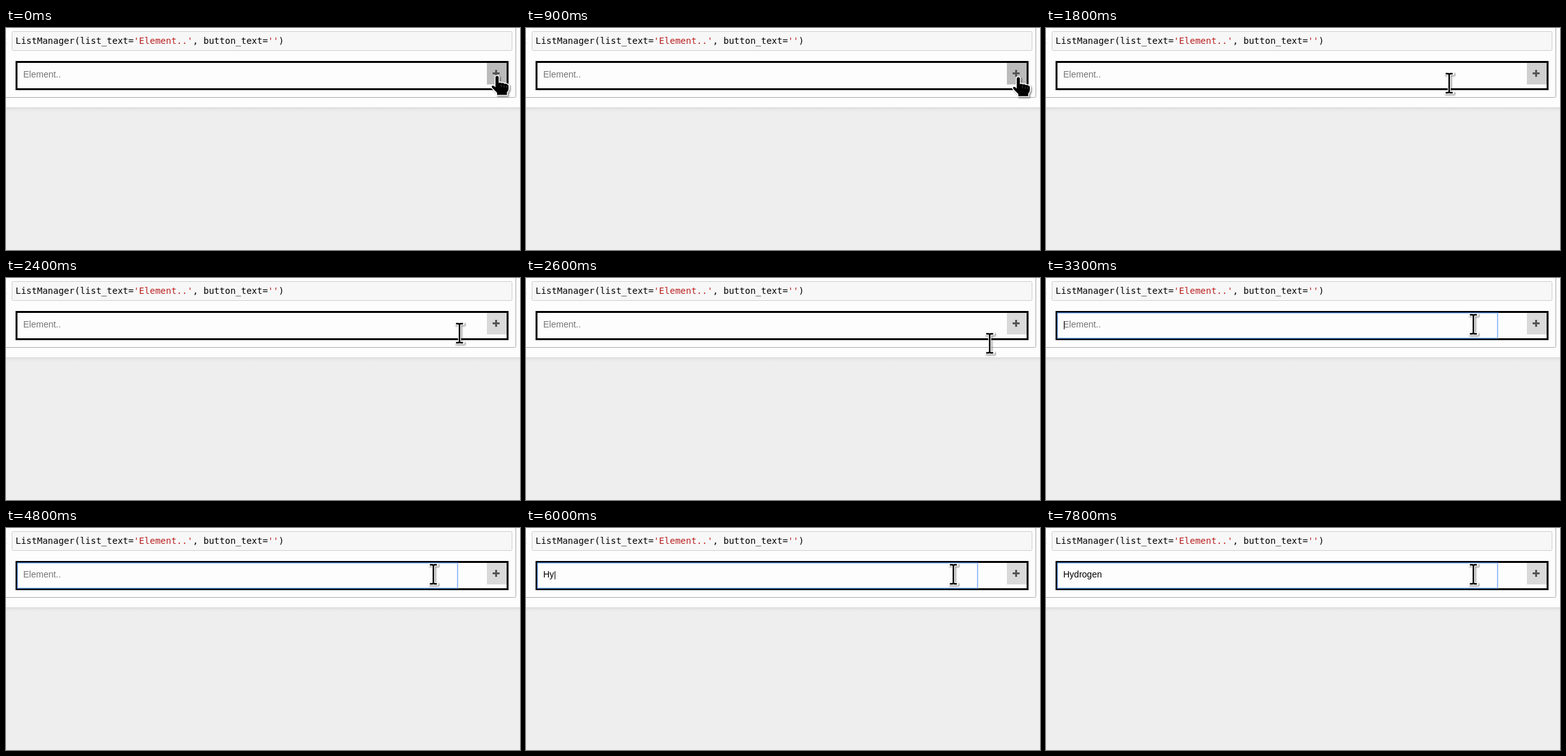
These frames come from a looping animation (807x350 px, 8000 ms). An HTML page:

```html
<!DOCTYPE html>
<html lang="en">
<head>
<meta charset="utf-8">
<title>List manager</title>
<style>
  html, body { margin: 0; width: 100%; height: 100%; overflow: hidden; background: #eee; }
  svg { display: block; }
  text { white-space: pre; }
  .code { font: 14px "DejaVu Sans Mono", monospace; }
  .field { font: 14px "Liberation Sans", Arial, sans-serif; }
  .string { fill: #ba2121; }
</style>
</head>
<body>
<svg width="807" height="350" viewBox="0 0 807 350">
  <defs>
    <linearGradient id="shade" x2="0" y2="1">
      <stop offset="0" stop-color="#dadada"/>
      <stop offset=".4" stop-color="#e6e6e6"/>
      <stop offset="1" stop-color="#eee"/>
    </linearGradient>
    <filter id="drop" x="-50%" y="-50%" width="200%" height="200%">
      <feDropShadow dx="1.5" dy="1.5" stdDeviation="1" flood-opacity=".5"/>
    </filter>
    <path id="beamShape" d="M-5.5-15H-2Q0-15 0-13Q0-15 2-15H5.5M0-14V14M-5.5 15H-2Q0 15 0 13Q0 15 2 15H5.5"/>
  </defs>

  <!-- page and notebook cell -->
  <rect width="807" height="350" fill="#eee"/>
  <rect width="807" height="125" fill="#fdfdfd"/>
  <rect y="125" width="807" height="7" fill="url(#shade)"/>
  <path d="M0 109.5H798.5Q800.5 109.5 800.5 107.5V0" fill="none" stroke="#ababab"/>
  <path d="M0 17h1v2H0zM0 23h1v2H0z" fill="#d9ecdd"/>
  <rect x="9.5" y="5.5" width="785" height="30" rx="2" fill="#f7f7f7" stroke="#cfcfcf"/>
  <text class="code" x="15" y="25">ListManager(list_text=<tspan class="string">'Element..'</tspan>, button_text=<tspan class="string">''</tspan>)</text>

  <!-- list widget -->
  <rect x="16.5" y="53.5" width="771" height="43" fill="#fdfdfd" stroke="#000" stroke-width="3"/>
  <rect id="button" x="755" y="55" width="31" height="34"/>
  <path d="M764 71.5H775M769.5 66V77" stroke="#555" stroke-width="3"/>
  <rect id="ring" x="18" y="55" width="691" height="40" fill="none" stroke="#4d90fe" stroke-opacity=".55" stroke-width="2"/>
  <text id="entry" class="field" x="27" y="78"></text>
  <rect id="caret" y="68" width="1" height="13"/>

  <!-- pointers -->
  <g id="beam" filter="url(#drop)" fill="none">
    <use href="#beamShape" stroke="#fff" stroke-width="4.6" stroke-linecap="square"/>
    <use href="#beamShape" stroke="#000" stroke-width="2.4"/>
  </g>
  <g id="hand" filter="url(#drop)">
    <path d="M-2.5 2Q-2.5-.5 0-.5T2.5 2V11Q4 9 7 11Q9 9.8 11.5 12Q14 11 16 13Q18 13 18 16V20Q18 23 15.5 25V29.5H0V26L-7.5 18.5Q-9.5 15.5-7 14.8Q-5 14.5-2.5 17.5Z"
      fill="#000" stroke="#fff" stroke-width="3" stroke-linejoin="round" paint-order="stroke"/>
    <path d="M6.5 13V17M11 14V18M15 15V18" stroke="#666" stroke-width=".7"/>
  </g>
</svg>
<script>
const LOOP = 8000, STEP = 100;
const NUDGE = 900, LEAVE = 1600, FOCUS = 3000, LAST_KEY = 7200;
const BLINK = 600, FADE = 300;
const WORD = 'Hydrogen';
const keyTimes = [5500, 6000, 6200, 6500, 6600, 7000, 7000, 7600];

// Turning points of the text pointer.
const route = [
  { t: LEAVE, x: 736, y: 87 },
  { t: 1900, x: 581, y: 87 },
  { t: 2100, x: 581, y: 87 },
  { t: 2400, x: 712, y: 87 },
  { t: 2600, x: 728, y: 103 },
  { t: 2900, x: 661, y: 75 },
  { t: 3300, x: 671, y: 73 }
];

const $ = id => document.getElementById(id);
const show = (node, on) => node.setAttribute('visibility', on ? 'visible' : 'hidden');
const place = (node, x, y) => node.setAttribute('transform', `translate(${Math.round(x)} ${Math.round(y)})`);
const clamp = v => Math.min(1, Math.max(0, v));
const mix = (a, b, u) => a + (b - a) * u;

function drawPointer(t) {
  const onButton = t < LEAVE;
  show($('hand'), onButton);
  show($('beam'), !onButton);
  const shift = t < NUDGE ? 0 : 2;
  place($('hand'), 771 + shift, 76 + shift);

  const next = Math.max(1, route.findIndex(p => p.t > t));
  const [a, b] = t < route.at(-1).t ? [route[next - 1], route[next]] : route.slice(-2);
  const u = clamp((t - a.t) / (b.t - a.t));
  place($('beam'), mix(a.x, b.x, u), mix(a.y, b.y, u));
}

function drawField(t) {
  show($('ring'), t >= FOCUS);
  const count = keyTimes.filter(time => time <= t).length;
  const entry = $('entry');
  const content = count ? WORD.slice(0, count) : 'Element..';
  if (entry.textContent !== content) entry.textContent = content;
  entry.setAttribute('fill', count ? '#000' : '#757575');

  // The caret blinks from focus, stays lit while typing, then blinks again.
  const idle = Math.max(0, t - (count ? LAST_KEY : FOCUS));
  show($('caret'), t >= FOCUS && Math.floor(idle / BLINK) % 2 === 0);
  $('caret').setAttribute('x', Math.round(28 + (count && entry.getComputedTextLength())));
}

function draw(time) {
  const t = Math.floor(time / STEP) * STEP;
  const grey = Math.round(mix(187, 217, clamp((t - LEAVE) / FADE)));
  $('button').setAttribute('fill', `rgb(${grey},${grey},${grey})`);
  drawPointer(t);
  drawField(t);
}

const began = performance.now();
function tick() {
  draw((performance.now() - began) % LOOP);
  requestAnimationFrame(tick);
}
tick();
</script>
</body>
</html>
```
